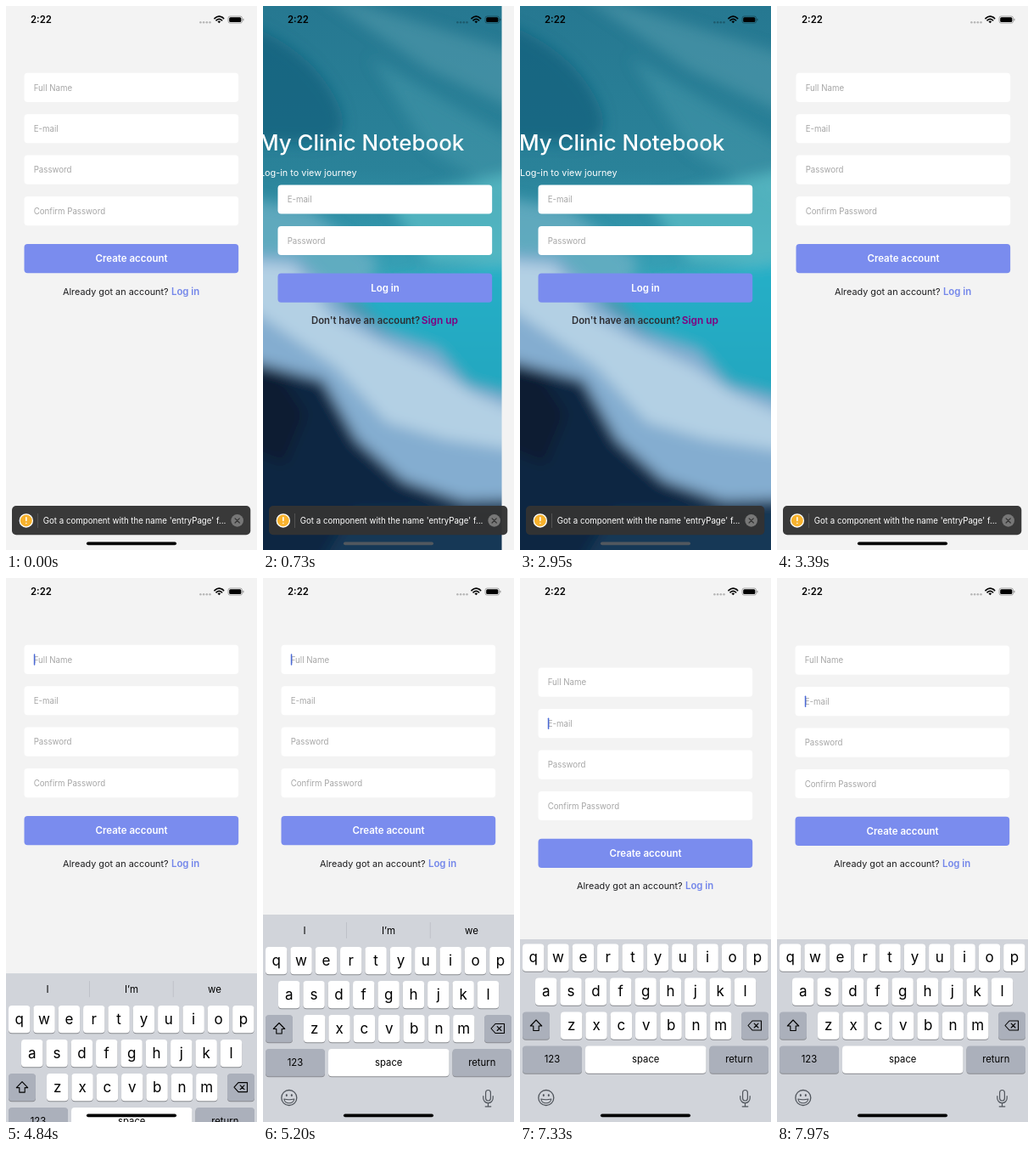
Animation of 296 by 640 pixels, one loop 8 s. Source, as an HTML page:

```html
<!DOCTYPE html>
<html lang="en">
<head>
<meta charset="utf-8">
<title>Sign-up flow</title>
<style>
  html, body { margin: 0; width: 100%; height: 100%; overflow: hidden; background: #f3f3f3; }
  svg { display: block; width: 100%; height: 100%; font-family: Inter, Roboto, "Liberation Sans", sans-serif; }
  .mid { text-anchor: middle; }
  .end { text-anchor: end; }
  .bold { font-weight: 600; }
</style>
</head>
<body>
<svg id="stage" viewBox="0 0 296 640"></svg>
<script>
const W = 296, LOOP = 8000;

const STEPS = [0, 500, 610, 730, 830, 930, 2950, 3060, 3170, 3280, 3390,
  4720, 4840, 4960, 5080, 5200, 5320, 5440, 5580, 6130, 6250, 6470, 6590,
  7130, 7240, 7340, 7450, 7550, 7650, 7760, 7860, 7970];

const rect = (x, y, w, h, r, fill, more = '') =>
  `<rect x="${x}" y="${y}" width="${w}" height="${h}" rx="${r}" fill="${fill}" ${more}/>`;
const text = (x, y, size, fill, str, more = '') =>
  `<text x="${x}" y="${y}" font-size="${size}" fill="${fill}" ${more}>${str}</text>`;
const path = (d, more = '') => `<path d="${d}" ${more}/>`;
const blob = (fill, d, alpha = 1) => path(d, `fill="${fill}" opacity="${alpha}"`);
const line = (color, width) =>
  `fill="none" stroke="${color}" stroke-width="${width}" stroke-linecap="round" stroke-linejoin="round"`;

const field = (y, label) =>
  rect(21.5, y, 252.7, 34.2, 4, '#fff') + text(32.7, y + 20.8, 9.7, '#a6a6a6', label);
const button = (y, label) =>
  rect(21.5, y, 252.7, 34.2, 4, '#7a8cee') +
  text(148, y + 21, 11.5, '#fff', label, 'class="mid bold"');

// The sea photo, reduced to soft areas of its main tones.
const ocean = `<g clip-path="url(#screen)">
  ${rect(0, 0, W, 640, 0, 'url(#water)')}
  <g filter="url(#soft)">
    ${blob('#145f7b', 'M-20 20Q60 50 90 110T40 160H-20Z', 0.7)}
    ${blob('#5aa0b2', 'M60 -20L320 60V130L200 75Z', 0.5)}
    ${blob('#4d9db0', 'M130 60L320 170V240L200 170Z', 0.45)}
    ${blob('#5fc0c9', 'M150 230L320 190V310L200 300Z', 0.7)}
    ${blob('#22b0c8', 'M100 330L320 300V480L190 425Z', 0.9)}
    ${blob('#6fb0c4', 'M-20 225L60 240 140 300 120 345 -20 310Z', 0.75)}
    ${blob('#0b2743', 'M-20 400L70 430 130 500 200 560 320 575V660H-20Z')}
    ${blob('#84add0', 'M-20 290L45 295 100 350 150 385 210 405 245 445 320 465V580L240 582 170 558 115 510 75 440 -20 415Z')}
    ${blob('#b3d0e4', 'M-20 300L40 305 85 365 140 395 205 425 250 455 320 485V525L220 510 150 490 90 425 -20 350Z')}
    ${blob('#081c33', 'M-20 425L25 435 55 480 30 540 -20 520Z')}
    ${blob('#173f5e', 'M110 595L320 590V660H70Z', 0.7)}
  </g>
</g>`;

const login = ocean +
  text(-1, 170, 25.9, '#fff', 'My Clinic Notebook', 'font-weight="500"') +
  text(0, 200.3, 10.85, '#fff', 'Log-in to view journey') +
  field(210.4, 'E-mail') + field(258.9, 'Password') + button(314.6, 'Log in') +
  text(61, 374, 11.3, '#2e2e33', 'Don\'t have an account?', 'class="bold"') +
  text(234, 374, 11.9, '#800080', 'Sign up', 'class="bold end"');

const signup = rect(-1, 0, W + 3, 640, 0, '#f3f3f3') + '<g id="form">' +
  ['Full Name', 'E-mail', 'Password', 'Confirm Password']
    .map((label, i) => field(78.7 + i * 48.45, label)).join('') +
  button(280, 'Create account') +
  text(67, 339.5, 10.85, '#1c1c1e', 'Already got an account?') +
  text(228.3, 339.5, 11.4, '#7487ea', 'Log in', 'class="bold end"') +
  rect(32.8, 89.3, 1.5, 13.4, 0.7, '#4b6ad8', 'id="caret"') + '</g>';

const status = text(29, 20.2, 11.3, '#000', '2:22', 'class="bold"') +
  [229.4, 233.1, 236.8, 240.5].map(x => `<circle cx="${x}" cy="19.2" r="1.25" opacity=".25"/>`).join('') +
  path('M246 14.6Q251.3 9.8 256.6 14.6M248 16.8Q251.3 13.9 254.6 16.8', line('#000', 1.7)) +
  path('M249.4 18.2Q251.3 16.7 253.2 18.2L251.3 20.2Z') +
  rect(262, 12, 16.6, 8.2, 2.4, 'none', 'stroke="#000" stroke-width=".8" opacity=".38"') +
  rect(263.2, 13.2, 14.2, 5.8, 1.5, '#000') +
  rect(279.4, 14.7, 1, 2.8, 0.5, '#000', 'opacity=".4"');

const toast = rect(7, 588, 281.3, 34.3, 5, '#333', 'opacity=".97"') +
  '<circle cx="23.8" cy="605.4" r="7.6" fill="#f8b22d" stroke="#fff" stroke-width="1.3"/>' +
  rect(23.1, 601, 1.5, 5.3, 0.7, '#fff') + rect(23.1, 607.7, 1.5, 1.6, 0.7, '#fff') +
  rect(37.2, 597, 0.8, 17, 0, '#5c5c5c') +
  text(43.8, 609, 9.7, '#fff', 'Got a component with the name \'entryPage\' f…') +
  '<circle cx="272.7" cy="605.4" r="7.3" fill="#777"/>' +
  path('M270.1 602.8l5.2 5.2m0-5.2l-5.2 5.2', line('#333', 1.2));

const GREY = '#abb0bb';
const key = (x, y, w, fill, label = '', size = 17) =>
  rect(x, y + 1, w, 32.2, 4, '#898b90') + rect(x, y, w, 32.2, 4, fill) +
  text(x + w / 2, y + 16 + size * 0.35, size, '#000', label, 'class="mid"');
const row = (letters, x, y) =>
  [...letters].map((c, i) => key(x + i * 29.35, y, 25.4, '#fff', c)).join('');

const keys = row('qwertyuiop', 3, 434) + row('asdfghjkl', 18, 474) + row('zxcvbnm', 48, 514) +
  key(3, 514, 32, GREY) + key(261, 514, 32, GREY) +
  key(3, 554, 70, GREY, '123', 11.3) + key(77, 554, 142.5, '#fff', 'space', 11.3) +
  key(223.5, 554, 69.5, GREY, 'return', 11.3) +
  path('M19 523.5l-6.7 7h3.5v5.5h6.4v-5.5h3.5Z', line('#000', 1.1)) +
  path('M274 524.5h10.5v11h-10.5l-5-5.5Zm2.2 3.2l4.8 4.8m0-4.8l-4.8 4.8', line('#000', 1.1));

const board = '<rect id="panel" width="296" fill="#d1d4da"/><g id="hints">' +
  [['I', 49], ['I’m', 148], ['we', 246]]
    .map(([word, x]) => text(x, 418.7, 11.5, '#000', word, 'class="mid"')).join('') +
  rect(98, 405, 0.8, 19, 0, '#b9bcc3') + rect(196.8, 405, 0.8, 19, 0, '#b9bcc3') + '</g>' +
  `<g id="keys">${keys}</g>` +
  `<circle cx="30.8" cy="611.5" r="9" ${line('#50555c', 1.3)}/>` +
  path('M24.8 613q6 1.6 12 0q-.8 4.8-6 4.8t-6-4.8Z', line('#50555c', 1.1)) +
  [27.8, 33.8].map(x => `<ellipse cx="${x}" cy="608.5" rx="1" ry="1.5" fill="#50555c"/>`).join('') +
  rect(262.6, 602.5, 5.8, 12.5, 2.9, 'none', 'stroke="#50555c" stroke-width="1.2"') +
  path('M259.8 609.5v2.5a5.7 5.7 0 0 0 11.4 0v-2.5M265.5 617.8v4m-3.3 0h6.6', line('#50555c', 1.2));

document.getElementById('stage').innerHTML = `
  <defs>
    <clipPath id="screen">${rect(0, 0, W, 640, 0, '#000')}</clipPath>
    <filter id="soft" x="-10%" y="-10%" width="120%" height="120%"><feGaussianBlur stdDeviation="8"/></filter>
    <linearGradient id="water" x1="0" y1="0" x2="0" y2="1">
      <stop offset="0" stop-color="#267891"/>
      <stop offset=".3" stop-color="#2a8299"/>
      <stop offset=".5" stop-color="#38a3b8"/>
      <stop offset=".8" stop-color="#12385a"/>
      <stop offset="1" stop-color="#0a2039"/>
    </linearGradient>
  </defs>
  <g id="login">${login}</g>
  <g id="signup">${signup}</g>
  ${status}${toast}
  <g id="board">${board}</g>
  ${rect(95, 630.4, 106, 3.8, 1.9, '#000', 'id="home"')}`;

const el = {};
document.querySelectorAll('g[id], rect[id]').forEach(n => el[n.id] = n);
const move = (node, x, y) => node.setAttribute('transform', `translate(${x.toFixed(2)} ${y.toFixed(2)})`);
const show = (node, on) => node.setAttribute('visibility', on ? 'inherit' : 'hidden');

// Critically damped spring: share of the distance still to go.
function rest(ms, rate = 0.018) {
  const u = Math.max(0, ms) * rate;
  return (1 + u) * Math.exp(-u);
}

function pageShift(t) {
  if (t < 500 || t >= 4720) return 0;
  if (t < 930) return W * (1 - rest(t - 460));
  return t < 2950 ? W : W * rest(t - 2950);
}

// The form is dragged down, then springs back.
function pull(t) {
  if (t < 7130) return 0;
  if (t < 7450) return 38 * Math.sin(Math.PI / 2 * (t - 7030) / 420);
  return 38 * rest(t - 7450, 0.011);
}

function caretAlpha(t) {
  const phase = (t - 5580 + 2020) % 1010;
  if (phase < 660 || phase >= 950) return 1;
  return phase < 800 ? 0 : 0.5;
}

function draw(time) {
  let t = 0;
  for (const s of STEPS) if (s <= time) t = s;

  const shift = pageShift(t), email = t >= 6130;
  move(el.signup, shift, 0);
  move(el.login, -0.3 * (W - shift), 0);
  show(el.login, shift > 0);
  show(el.signup, shift < W);
  el.home.setAttribute('fill', shift > W / 2 ? '#51585f' : '#000');

  move(el.form, 0, pull(t));
  show(el.caret, t >= 4720);
  el.caret.setAttribute('opacity', caretAlpha(t));
  move(el.caret, 0, email ? 48.45 : 0);

  const top = email ? 425 : 396;
  show(el.board, t >= 4720);
  move(el.board, 0, 244 * (t < 5200 ? rest(t - 4700) : 0));
  el.panel.setAttribute('y', top);
  el.panel.setAttribute('height', 640 - top);
  show(el.hints, !email);
  move(el.keys, 0, email ? -3.5 : 0);
}

const start = performance.now();
function tick() {
  draw((performance.now() - start) % LOOP);
  requestAnimationFrame(tick);
}
tick();
</script>
</body>
</html>
```
